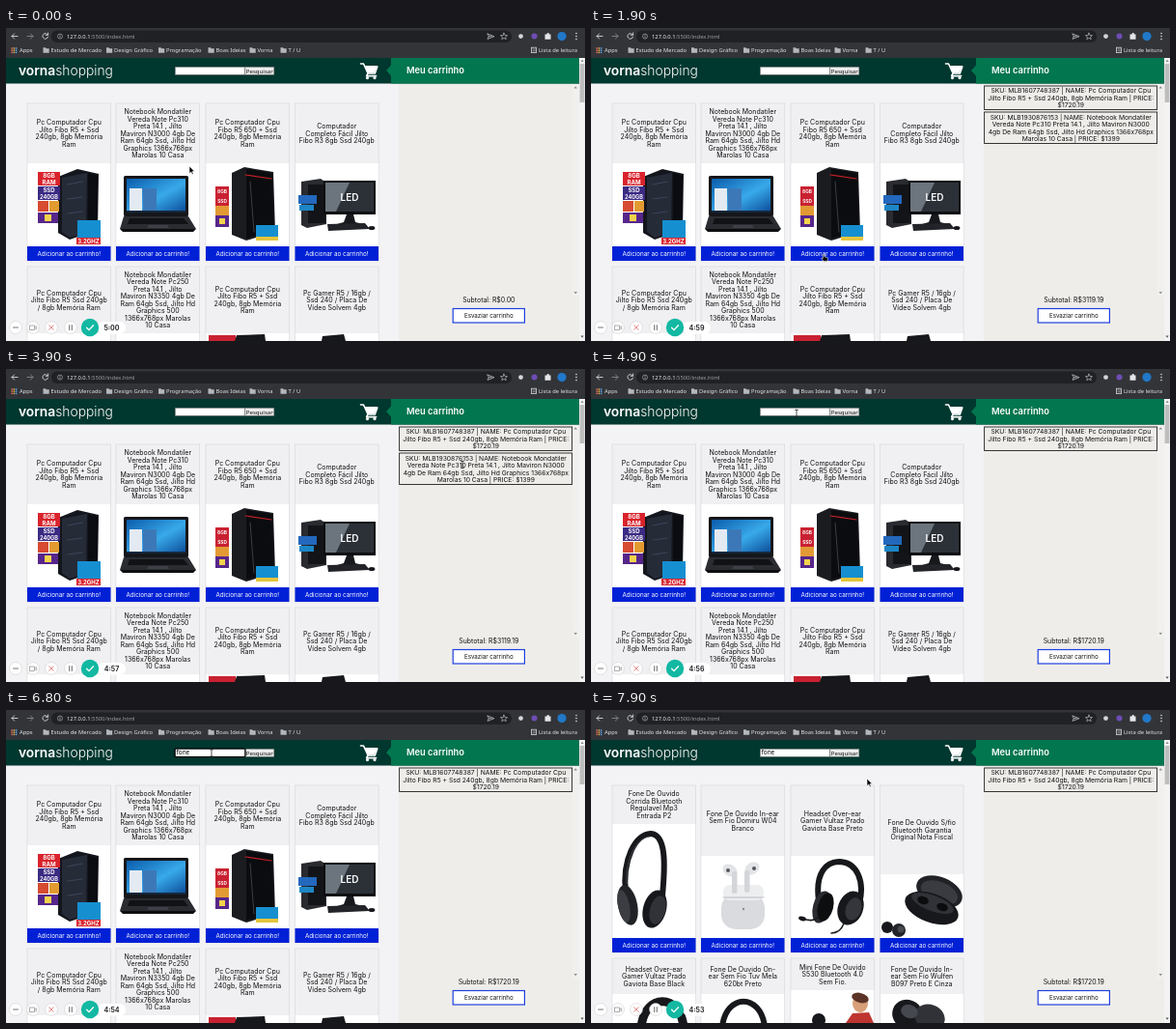
Recreate the animation shown at these times as an HTML page. Size 600 by 324 pixels, loop 8 s.

```html
<!DOCTYPE html>
<html lang="pt-BR">
<head>
<meta charset="utf-8">
<title>Loja com carrinho</title>
<style>
html, body { margin: 0; width: 100%; height: 100%; overflow: hidden; background: #f3f2f4; }
svg { display: block; width: 600px; height: 324px; font-family: Inter, sans-serif; }
.ui { font-family: "Noto Sans", sans-serif; }
</style>
</head>
<body>
<svg id="stage" viewBox="0 0 600 324"></svg>
<script>
const BLUE = '#0020d6', INK = '#1c1c20', BLACK = '#17181b';
const rect = (x, y, w, h, fill, more = '') =>
  `<rect x="${x}" y="${y}" width="${w}" height="${h}" fill="${fill}" ${more}/>`;
const circle = (x, y, r, fill, more = '') => `<circle cx="${x}" cy="${y}" r="${r}" fill="${fill}" ${more}/>`;
const oval = (x, y, rx, ry, fill, turn = 0) =>
  `<ellipse rx="${rx}" ry="${ry}" fill="${fill}" transform="translate(${x} ${y}) rotate(${turn})"/>`;
const poly = (points, fill) => `<polygon points="${points}" fill="${fill}"/>`;
const line = (d, color, width = 1) =>
  `<path d="${d}" fill="none" stroke="${color}" stroke-width="${width}" stroke-linecap="round" stroke-linejoin="round"/>`;
const text = (x, y, s, size, fill = INK, more = '') =>
  `<text x="${x}" y="${y}" font-size="${size}" fill="${fill}" ${more}>${s}</text>`;
const MID = 'text-anchor="middle"';
const lines = (x, cy, rows, size = 7) => rows.map((s, i) =>
  text(x, cy + (i - (rows.length - 1) / 2) * 7.5 + 2.6, s, size, '#111', MID)).join('');
const group = (id, body) => `<g id="${id}">${body}</g>`;

// Browser window
function browser() {
  const folder = (x, name) => `<path d="M${x} 20.2h2.4l1 1h2.8v4.6h-6.2z" fill="#b4b7bb"/>` + text(x + 8, 25.2, name, 5.8, '#e4e5e7');
  let s = rect(0, 0, 600, 31, '#323438') + rect(47, 2.5, 477, 12.5, '#202124', 'rx="6"');
  s += line('M12 8.5H6m2.6-2.6L6 8.5l2.6 2.6', '#d5d7da', .9) + line('M22 8.5h6m-2.6-2.6L28 8.5l-2.6 2.6', '#85888c', .9);
  s += line('M43.2 7a2.8 2.8 0 1 0 .3 2.2M43.6 5v2.3h-2.3', '#d5d7da', .9);
  s += circle(56, 8.6, 2.5, 'none', 'stroke="#a9acb0" stroke-width=".7"') + line('M56 8.3v1.4M56 7.1v.1', '#a9acb0', .7);
  s += text(63, 10.8, '127.0.0.1<tspan fill="#9b9ea3">:5500/index.html</tspan>', 5.8, '#f1f1f1');
  s += line('M499 6l7 2.7-7 2.7 1.2-2.7zM500.2 8.7h3', '#b8babd', .8);
  s += line('M516 5.2l1 2.3 2.5.2-1.9 1.6.6 2.4-2.2-1.3-2.2 1.3.6-2.4-1.9-1.6 2.5-.2z', '#b8babd', .7);
  s += circle(533.5, 8.6, 2.4, '#d3d6d9') + circle(547.5, 8.6, 3, '#6f4db4');
  s += '<path d="M558.5 6.5h2c0-2 2.4-2 2.4 0h1.6v5.3h-6z" fill="#e4e6e8"/>' + circle(576, 8.6, 4.6, '#2178c8');
  s += [5.6, 8.6, 11.6].map(y => circle(591, y, .8, '#d5d7da')).join('');
  for (let i = 0; i < 9; i++)
    s += rect(5.4 + i % 3 * 2.2, 20.2 + (i / 3 | 0) * 2.2, 1.5, 1.5, ['#e46a5e', '#e9b24a', '#63a8e8'][i % 3]);
  s += text(14, 25.2, 'Apps', 5.8, '#e4e5e7');
  s += folder(38.5, 'Estudo de Mercado') + folder(104, 'Design Gráfico') + folder(158, 'Programação') +
    folder(209.5, 'Boas Ideias') + folder(252.5, 'Vorna') + folder(284.5, 'T / U');
  s += rect(544.6, 20.2, 5, 5.4, 'none', 'stroke="#d5d7da" stroke-width=".8"') + line('M546 22h2.4M546 23.8h2.4', '#d5d7da', .6) +
    text(552, 25.2, 'Lista de leitura', 5.8, '#e4e5e7');
  return `<g class="ui">${s}</g>`;
}

function header() {
  return rect(0, 30.5, 594, 27, '#00372f') + poly('594,30.5 399,30.5 399,38.5 394,44 399,49.5 399,57.5 594,57.5', '#02764e') +
    text(13, 48.6, '<tspan font-weight="600">vorna</tspan>shopping', 13.8, '#fff', 'font-weight="300"') +
    line('M367.5 37h3l4.6 10h7.2l2.5-7h-12M375 47l-1.4 2.6h10', '#fff', 1.6) + poly('371.5,39 385,39 381.5,46.5 375,46.5', '#fff') +
    circle(374.5, 51.6, 1.6, '#fff') + circle(382, 51.6, 1.6, '#fff') +
    text(415, 47.4, 'Meu carrinho', 9.3, '#fff', 'font-weight="600"') +
    rect(175.3, 40.3, 72.4, 8, '#fff', 'stroke="#767676" stroke-width=".6"') +
    rect(247.8, 40.3, 30, 8, '#ededed', 'stroke="#767676" stroke-width=".6"') +
    `<g class="ui">${text(262.8, 46.6, 'Pesquisar', 6.1, '#111', MID)}<text id="query" x="176.6" y="46.4" font-size="6.4"></text></g>` +
    `<rect id="focus" x="175" y="40" width="73" height="8.5" rx="1" fill="none" stroke="#000" stroke-width="1.2"/>`;
}

// Products
const COLS = [22, 114, 207, 299.5];
function card(col, top, bottom, photoTop, rows, art = '') {
  const x = COLS[col], c = x + 43.3, edge = bottom - 15;
  return rect(x, top, 86.6, bottom - top, '#f0eff1', 'stroke="#dcdbde" stroke-width=".8"') +
    rect(x + .4, photoTop, 85.8, edge - photoTop, '#fff') + art +
    rect(x, edge, 86.5, 15, BLUE) + text(c, edge + 9.7, 'Adicionar ao carrinho!', 6.3, '#fff', MID) +
    lines(c, (top + photoTop) / 2, rows);
}
const label = (x, y, w, h, fill, s, size) =>
  rect(x, y, w, h, fill) + text(x + w / 2, y + h / 2 + size * .36, s, size, '#fff', MID + ' font-weight="700"');

const tower = poly('54,154 74,146 96,151 95,209 66,219 54,212', '#14161d') + poly('58,155 84,150 83,212 66,217 58,211', '#262b38') +
  poly('85,150 95,153 94,207 85,211', '#0b0c12') + line('M64 162l15-3M64 177l15-2M64 192l15-2', '#434d63', .8) +
  label(33, 149, 23, 7, '#d9232c', '8GB', 6) + label(33, 156, 23, 7, '#d9232c', 'RAM', 6) +
  label(33, 164, 23, 7, '#3b2a83', 'SSD', 6) + label(33, 171, 23, 7, '#3b2a83', '240GB', 5.6) +
  rect(33, 179, 11, 11, '#d64b31') + rect(45, 179, 10, 11, '#e29b30') + rect(33, 191, 21, 11, '#57268b') + rect(40, 193, 7, 7, '#f2d34c') +
  rect(74, 199, 24, 18, '#168fd0') + label(73, 217, 25, 7, '#d9232c', '3.2GHZ', 6);
const notebook = '<defs><linearGradient id="sky" x2="1" y2="1"><stop stop-color="#0b5cab"/><stop offset=".55" stop-color="#38a9ea"/><stop offset="1" stop-color="#0a4b97"/></linearGradient></defs>' +
  rect(122, 153, 67, 42, '#15161a', 'rx="1.5"') + rect(125, 156, 61, 35, 'url(#sky)') + rect(128, 166, 13, 23, '#e4eaf1') +
  rect(142, 166, 14, 23, '#3c78b8') + rect(125, 189, 61, 2, '#16283e') +
  poly('122,195 189,195 197,208 118,208', '#2a2c31') + poly('128,197 184,197 189,203 126,203', '#111215') +
  poly('148,204 167,204 169,207 146,207', '#3d4046') + poly('118,208 197,208 194,211 121,211', '#0d0e10');
const gamer = poly('234,150 247,144 277,149 279,211 249,220 234,214', '#1b1c20') + poly('249,146 276,150 278,210 249,218', '#0b0c0f') +
  line('M248 152L275 156', '#c22228', 1.2) + line('M253 159l4 52', '#3b3d43', 1) +
  label(217, 164, 14, 10, '#c92131', '8GB', 4.8) + label(217, 174, 14, 10, '#c92131', 'SSD', 4.8) +
  rect(217, 184, 14, 10, '#e39a35') + rect(217, 194, 14, 12, '#57268b') + rect(221, 197, 6, 6, '#f2d34c') +
  rect(259, 204, 23, 16, '#168fd0') + rect(259, 216, 23, 4, '#e5c53c');
const desktop = poly('306,159 326,156 332,160 332,203 312,207 306,204', '#292b30') + rect(313, 162, 18, 40, '#131418') +
  rect(329, 158, 54, 35, '#0d0e12') + rect(331, 160, 50, 30, '#2c3138') + poly('331,160 356,160 342,190 331,190', '#6c757d') +
  text(356, 179, 'LED', 10, '#fff', MID + ' font-weight="600"') +
  poly('353,193 360,193 362,201 370,203 343,203 350,201', '#17181c') + poly('333,203 372,202 377,208 334,210', '#22242a') + oval(379, 207, 3.4, 2, BLACK) +
  rect(303, 173, 19, 9, '#2368bd') + rect(304, 183, 15, 6, '#1d86c6');

const pc = ['Pc Computador Cpu', 'Jilto Fibo R5 + Ssd', '240gb, 8gb Memória', 'Ram'];
const catalog = () =>
  card(0, 78, 241, 140, pc, tower) +
  card(1, 78, 241, 140, ['Notebook Mondatiler', 'Vereda Note Pc310', 'Preta 14.1 , Jilto', 'Maviron N3000 4gb De', 'Ram 64gb Ssd, Jilto Hd', 'Graphics 1366x768px', 'Marolas 10 Casa'], notebook) +
  card(2, 78, 241, 140, ['Pc Computador Cpu', 'Fibo R5 650 + Ssd', '240gb, 8gb Memória', 'Ram'], gamer) +
  card(3, 78, 241, 140, ['Computador', 'Completo Fácil Jilto', 'Fibo R3 8gb Ssd 240gb'], desktop) +
  card(0, 247, 420, 316, ['Pc Computador Cpu', 'Jilto Fibo R5 Ssd 240gb', '/ 8gb Memória Ram']) +
  card(1, 247, 420, 316, ['Notebook Mondatiler', 'Vereda Note Pc250', 'Preta 14.1 , Jilto', 'Maviron N3350 4gb De', 'Ram 64gb Ssd, Jilto Hd', 'Graphics 500', '1366x768px Marolas', '10 Casa']) +
  card(2, 247, 420, 316, pc, rect(210, 318, 28, 6, '#c92131') + poly('237,324 239,318 268,317 269,324', BLACK)) +
  card(3, 247, 420, 316, ['Pc Gamer R5 / 16gb /', 'Ssd 240 / Placa De', 'Vídeo Solvem 4gb'], poly('327,324 328,319 350,317 352,324', BLACK));

const headphones = line('M36 190C32 154 46 129 62 128C78 129 77 160 74 192', BLACK, 6) + line('M37 180C35 154 48 132 60 131', '#44474d', 1) +
  oval(38, 202, 10, 21, '#202226', -12) + oval(34, 203, 6, 17, '#3b3d43', -12) + oval(66, 206, 12, 20, BLACK, 15) + oval(69, 207, 8, 15, '#303238', 15);
const buds = rect(135, 190, 45, 37, '#d9dbde', 'rx="15"') + rect(137, 181, 42, 16, '#eceef0', 'rx="7"') + line('M137 194h42', '#b9bcc1', 1) +
  oval(144, 166, 8, 6, '#e3e4e7', 30) + rect(146, 167, 5.5, 23, '#d3d5d9', 'rx="2.5"') + oval(167, 164, 8, 6, '#e3e4e7', -30) +
  rect(159, 166, 5.5, 23, '#d3d5d9', 'rx="2.5"') + circle(142, 166, 2, '#54575c') + circle(169, 164, 2, '#54575c') + circle(158, 206, 1.2, '#8d9095');
const headset = line('M236 197C232 168 244 157 258 157C276 158 284 178 278 200', BLACK, 6) + oval(239, 204, 9, 17, '#292b30', 15) + oval(243, 204, 8, 15, '#0d0e10', 15) +
  oval(269, 205, 13, 18, BLACK, 20) + oval(272, 206, 8, 12, '#34363c', 20) + line('M236 214C231 219 226 218 219 216', BLACK, 1.6) +
  oval(219, 216, 4, 2.2, BLACK, 15) + line('M262 221Q258 231 249 231', BLACK, 1.5);
const budCase = oval(361, 188, 25, 15, '#202226', 22) + oval(361, 189, 20, 11, '#393b41', 22) + oval(353, 205, 29, 15, BLACK, 20) +
  oval(354, 200, 23, 8, '#303238', 20) + oval(344, 197, 6, 4, '#0b0c0e', 20) + oval(364, 204, 6, 4, '#0b0c0e', 20) +
  circle(307, 225, 6, BLACK) + circle(319, 228, 7, '#222429') + circle(321, 227, 3.5, '#464950');
const arch = (x, width) => line(`M${x - 22} 328C${x - 18} 293 ${x + 18} 293 ${x + 22} 328`, BLACK, width);
const child = oval(279, 304, 8, 9, '#d7a079') + oval(279, 298, 9, 5, '#5c3427', 15) + poly('264,324 271,314 288,313 293,324', '#bf3531');
const results = () =>
  card(0, 78, 251, 118, ['Fone De Ouvido', 'Corrida Bluetooth', 'Regulavel Mp3', 'Entrada P2'], headphones) +
  card(1, 78, 251, 151, ['Fone De Ouvido In-ear', 'Sem Fio Domiru W04', 'Branco'], buds) +
  card(2, 78, 251, 151, ['Headset Over-ear', 'Gamer Vultaz Prado', 'Gaviota Base Preto'], headset) +
  card(3, 78, 251, 170, ['Fone De Ouvido S/fio', 'Bluetooth Garantia', 'Original Nota Fiscal'], budCase) +
  card(0, 257, 430, 294, ['Headset Over-ear', 'Gamer Vultaz Prado', 'Gaviota Base Black'], arch(74, 9)) +
  card(1, 257, 430, 294, ['Fone De Ouvido On-', 'ear Sem Fio Tuv Mela', '620bt Preto'], arch(158, 6)) +
  card(2, 257, 430, 290, ['Mini Fone De Ouvido', 'S530 Bluetooth 4.0', 'Sem Fio.'], child + circle(236, 321, 7, BLACK)) +
  card(3, 257, 430, 294, ['Fone De Ouvido In-', 'ear Sem Fio Wulfen', 'B097 Preto E Cinza'], oval(328, 315, 16, 15, BLACK, 25) + oval(351, 318, 16, 13, '#303238', 20) + oval(330, 312, 9, 7, '#45484e', 20));

// Cart
const cartItem = (id, y, h, rows) => group(id,
  rect(407.6, y, 179, h, 'none', 'stroke="#222" stroke-width=".9"') + lines(497.3, y + h / 2, rows, 6.75));
const cart = () => rect(407, 57.5, 193, 267, '#eeedea') + rect(587, 57.5, 7, 221, '#f1f0ee') + rect(594, 30.5, 6, 294, '#f3f3f3') +
  rect(594.6, 37, 4.8, 40, '#bdbdbd') + poly('595.5,35 598.7,35 597.1,32.8', '#8b8b8b') +
  poly('588.5,62.5 592,62.5 590.2,60.2', '#8b8b8b') + poly('588.5,273 592,273 590.2,275.3', '#8b8b8b') + poly('595.5,318.5 598.7,318.5 597.1,320.8', '#555') +
  cartItem('item1', 60, 24.5, ['SKU: MLB1607748387 | NAME: Pc Computador Cpu', 'Jilto Fibo R5 + Ssd 240gb, 8gb Memória Ram | PRICE:', '$1720.19']) +
  cartItem('item2', 87, 32.5, ['SKU: MLB1930876153 | NAME: Notebook Mondatiler', 'Vereda Note Pc310 Preta 14.1 , Jilto Maviron N3000', '4gb De Ram 64gb Ssd, Jilto Hd Graphics 1366x768px', 'Marolas 10 Casa | PRICE: $1399']) +
  `<text id="total" x="500.3" y="284.2" font-size="6.9" fill="#111" ${MID}></text>` +
  rect(463.2, 290.5, 74.2, 14.5, '#fff', `stroke="#1f40e0" stroke-width="1.2"`) + text(500.3, 300, 'Esvaziar carrinho', 6.2, '#111', MID);

function recorder() {
  const knob = x => circle(x, 310, 6.4, '#fff', 'stroke="#cfcfd2" stroke-width=".6"');
  return [10, 28, 47, 67].map(knob).join('') + line('M7.5 310h5', '#777', 1) +
    rect(24.5, 308, 5, 4.4, 'none', 'stroke="#999" stroke-width=".8"') + line('M29.7 310l2-1.5v3.2z', '#999', .7) +
    line('M44.7 307.7l4.6 4.6m0-4.6l-4.6 4.6', '#e08484', .9) + line('M65.7 307.5v5M68.3 307.5v5', '#777', 1.1) +
    rect(95, 304, 29, 12.5, '#fff', 'rx="6"') + circle(87, 310, 9.2, '#12b8a2') + line('M83.6 310.2l2.4 2.4 4.5-4.8', '#fff', 1.3) +
    `<text id="timer" x="109.5" y="312.6" font-size="7" font-weight="700" fill="#2c2d31" ${MID}></text>`;
}

const pointer = (id, d) => `<path id="${id}" d="${d}" fill="#000" stroke="#fff" stroke-width=".6" stroke-linejoin="round"/>`;
const cursors = group('cursor',
  pointer('arrow', 'M0 0v7.6l1.8-1.6 1.2 2.7 1.2-.6-1.2-2.5h2.4z') +
  pointer('hand', 'M-.8.2q.8-.8 1.5 0v2.6l3 .7q.7.3.6 1.1l-.5 2.8h-3.9l-2.2-2.8q.2-1.1 1.5-.2z') +
  group('beam', line('M-1.4-3.6h2.8M0-3.6v7.2M-1.4 3.6h2.8', '#222', .8)));

const stage = document.getElementById('stage');
stage.innerHTML = rect(0, 0, 600, 324, '#f3f2f4') + group('catalog', catalog()) + group('results', results()) +
  cart() + header() + browser() + recorder() + cursors;
const el = id => document.getElementById(id);
const show = (id, on) => el(id).setAttribute('display', on ? 'inline' : 'none');

// Pointer path: time, x, y
const PATH = [
  [0, 190, 143], [100, 188, 147], [650, 89, 233], [1000, 89, 233], [1350, 157, 234], [1600, 157, 234],
  [1850, 241, 234], [2150, 243, 234], [2900, 452, 82], [3500, 473, 99], [4200, 473, 99],
  [4850, 213, 46], [5200, 213, 44.5], [6850, 213, 44.5], [7150, 264, 45], [7400, 264, 45], [7800, 286, 71], [8000, 286, 71]
];
function pointerAt(t) {
  const i = PATH.findIndex(p => p[0] > t), [t0, x0, y0] = PATH[i - 1], [t1, x1, y1] = PATH[i];
  const u = (t - t0) / (t1 - t0), k = u * u * (3 - 2 * u);
  return [x0 + (x1 - x0) * k, y0 + (y1 - y0) * k];
}

function draw() {
  const t = performance.now() % 8000;
  const [x, y] = pointerAt(t), found = t >= 7500;
  const first = t >= 1000, second = t >= 1600 && t < 4200;
  const inField = x > 175 && x < 248 && y > 40 && y < 49;
  const beam = inField || second && x > 408 && y > 60 && y < 120;
  const hand = !found && y > 226 && y < 241 && COLS.some(c => x > c && x < c + 87);
  el('cursor').setAttribute('transform', `translate(${x} ${y})`);
  show('beam', beam);
  show('hand', hand);
  show('arrow', !beam && !hand);
  show('item1', first);
  show('item2', second);
  show('catalog', !found);
  show('results', found);
  show('focus', t >= 5200 && t < 7300);
  el('query').textContent = 'fone'.slice(0, Math.max(0, Math.floor((t - 5700) / 200) + 1));
  el('total').textContent = 'Subtotal: R$' + (first * 1720.19 + second * 1399).toFixed(2);
  const left = 300 - Math.floor(t / 1000);
  el('timer').textContent = Math.floor(left / 60) + ':' + String(left % 60).padStart(2, '0');
  requestAnimationFrame(draw);
}
draw();
</script>
</body>
</html>
```
